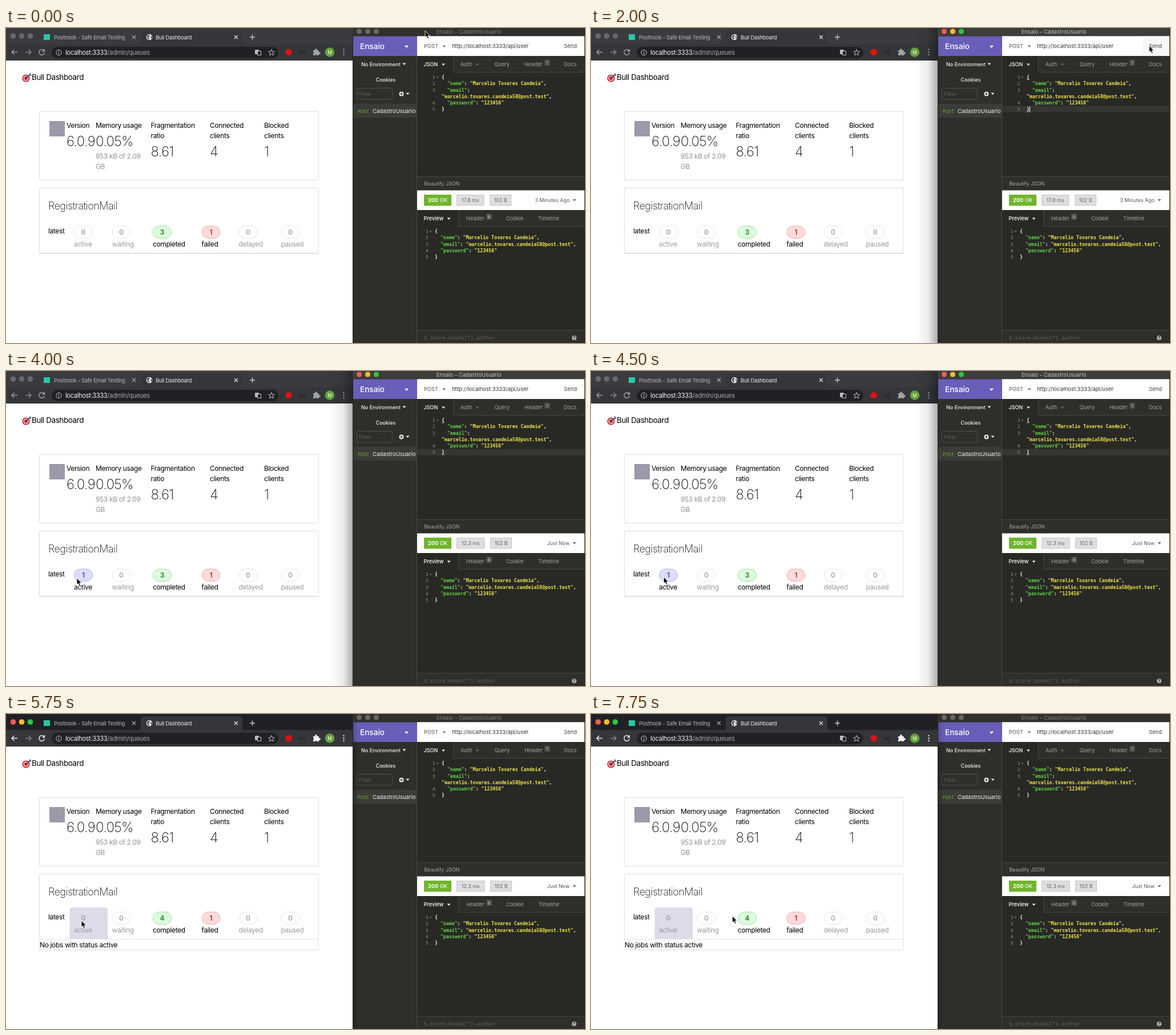
Recreate the animation shown at these times as an HTML page. Size 1014x552 px, loop 8 s.

```html
<!DOCTYPE html>
<html lang="en">
<head>
<meta charset="utf-8">
<title>Queue dashboard demo</title>
<style>
  html, body { margin: 0; width: 100%; height: 100%; overflow: hidden; background: #fff; }
  svg { display: block; width: 1014px; height: 552px; }
  text { font-family: Inter, Roboto, sans-serif; white-space: pre; }
  .tight { letter-spacing: -.03em; }
  .mono { font-family: "DejaVu Sans Mono", monospace; }
  .code { font-weight: 700; }
</style>
</head>
<body>
<svg id="stage" viewBox="0 0 1014 552"></svg>
<script>
const LOOP = 8000, STEP = 250;
const PERSON = 'Marcelio Tovares Candeia';
const EMAIL = 'marcelio.tovares.candeia58@post.test';
const WORKSPACE = 'Ensaio';

// When each state begins, in ms
const AT = { apiFocus: 2000, response: 2250, leaveSend: 2750, jobStarts: 4000,
  browserFocus: 4750, hoverActive: 5250, select: 5750 };

// Cursor tip: [time, x, y]
const PATH = [
  [0, 734, 5], [250, 748, 9], [750, 880, 26], [1250, 974, 33], [1500, 974, 33],
  [2000, 977.5, 31], [2500, 977.5, 31], [2750, 930, 62], [3250, 430, 250],
  [3750, 116, 368], [4000, 124, 363], [4750, 129, 360], [5500, 129, 360],
  [5750, 132, 362], [6000, 140, 362], [7000, 244, 363], [7250, 272, 361],
  [7500, 264, 358], [7750, 247.5, 354]
];

function cursorAt(t) {
  const i = PATH.findIndex(p => p[0] > t);
  if (i < 0) return PATH.at(-1).slice(1);
  const [a, b] = [PATH[i - 1], PATH[i]];
  const k = (t - a[0]) / (b[0] - a[0]);
  return [a[1] + (b[1] - a[1]) * k, a[2] + (b[2] - a[2]) * k];
}

const rect = (x, y, w, h, fill, more = '') =>
  `<rect x="${x}" y="${y}" width="${w}" height="${h}" fill="${fill}" ${more}/>`;
const circle = (x, y, r, fill, more = '') =>
  `<circle cx="${x}" cy="${y}" r="${r}" fill="${fill}" ${more}/>`;
const text = (x, y, size, fill, s, more = '') =>
  `<text x="${x}" y="${y}" font-size="${size}" fill="${fill}" ${more}>${s}</text>`;
const tight = (x, y, size, fill, s, weight = 400) =>
  text(x, y, size, fill, s, `class="tight" font-weight="${weight}"`);
const line = (d, color, width = 1, more = '') =>
  `<path d="${d}" fill="none" stroke="${color}" stroke-width="${width}" ${more}/>`;
const shape = (d, fill, more = '') => `<path d="${d}" fill="${fill}" ${more}/>`;
const caret = (x, y, fill, r = 3) => shape(`M${x - r} ${y - r / 2}h${2 * r}l${-r} ${r * 1.2}z`, fill);
const cross = (x, y, color) => line(`M${x - 3} ${y - 3}l6 6m0-6l-6 6`, color, 1.2);
const middle = 'text-anchor="middle"', end = 'text-anchor="end"', medium = 'font-weight="500"';

const lights = (x, y, r, gap, on, off) => ['#fc5b57', '#fdbc2e', '#29c940']
  .map((c, i) => circle(x + i * gap, y, r, on ? c : off)).join('');

function browserBar(active) {
  const icon = active ? '#f1f3f4' : '#a0a3a7', dim = '#85888c';
  const arrow = (x, dir, color) =>
    line(`M${x + 5 * dir} 42.5H${x - 5 * dir}m${4.5 * dir}-4.5l${-4.5 * dir} 4.5l${4.5 * dir} 4.5`, color, 1.4);
  return rect(0, 0, 607, 30, active ? '#202124' : '#3a3b3e') +
    rect(0, 28, 607, 29, '#35363a') +
    shape('M230 29q6 0 6-6V10q0-6 6-6H408q6 0 6 6V23q0 6 6 6z', '#35363a') +
    lights(12.5, 14, 4.8, 15, active, '#66686b') +
    rect(66, 11, 11, 10, '#28c8a8') +
    tight(84, 19.5, 9.4, '#b5b8bc', 'Postnook - Safe Email Testing') +
    tight(262, 19.5, 9.4, '#e8eaed', 'Bull Dashboard') +
    circle(251, 16, 5.3, '#e8eaed') +
    shape('M247 13l4-1 1 2-3 2 2 2-1 3-3-4zM253 15l2-1 1 3-2 2z', '#55585c') +
    cross(224, 16, '#a8abaf') + cross(403, 16, '#e0e2e5') +
    line('M427 16h9m-4.5-4.5v9', '#c5c8cc', 1.4) +
    arrow(15, 1, icon) + arrow(39, -1, dim) +
    line('M66.5 39.5a4.8 4.8 0 1 0 .9 4', icon, 1.4) + shape('M68 36.5v5h-5z', icon) +
    rect(80, 33, 397, 20, '#202124', 'rx="10"') +
    circle(92.5, 43, 4.7, 'none', 'stroke="#d0d2d5"') + line('M92.5 42v3.6m0-5.6v1.1', '#d0d2d5', 1.1) +
    tight(104, 46.8, 11.1, '#f1f3f4', 'localhost:3333<tspan fill="#a2a5a9">/admin/queues</tspan>') +
    rect(436, 38, 7, 8, '#b9bcc0', 'rx="1"') + rect(440.5, 40.5, 6, 7, '#202124', 'stroke="#b9bcc0"') +
    shape('M465 37.5l1.5 3.6 3.8.3-2.9 2.5.9 3.8-3.3-2-3.3 2 .9-3.8-2.9-2.5 3.8-.3z', 'none', 'stroke="#c4c7ca"') +
    circle(495, 42.5, 5.8, '#dc1414') +
    text(518.5, 46, 9, '#17181a', '(•)', middle) +
    shape('M538 39h3.2a2 2 0 1 1 3.6 0h3v3.3a2 2 0 1 1 0 3.5V48h-3.3a1.8 1.8 0 0 0-3.3 0H538v-3a1.8 1.8 0 0 0 0-3.3z', icon) +
    circle(567, 42.5, 8.3, '#64a338') + text(567, 45.6, 8.5, '#fff', 'M', middle) +
    [38, 42.5, 47].map(y => circle(591.5, y, 1.2, icon)).join('');
}

function stats() {
  const cols = [[106, '6.0.9', 'Version'], [157, '0.05%', 'Memory usage'],
    [253.5, '8.61', 'Fragmentation', 'ratio'], [357, '4', 'Connected', 'clients'], [452, '1', 'Blocked', 'clients']];
  return rect(58.5, 146.5, 488.5, 120, '#fff', 'stroke="#dedee2" rx="1"') +
    rect(76, 163, 27, 27, '#9a9aab') +
    cols.map(([x, value, a, b]) => tight(x, 175, 12, '#000', a) +
      (b ? tight(x, 193, 12, '#000', b) : '') +
      tight(x, b ? 224.5 : 206.5, 24, '#111', value, 200)).join('') +
    tight(157, 229, 12, '#949494', '953 kB of 2.09') + tight(157, 247, 12, '#949494', 'GB');
}

function queue(s) {
  const gray = ['#fff', '#e6e6ea', '#a2a2aa'];
  const tabs = [
    ['active', 119, s.running, ['#dcdcff', '#b5b5ee', '#47478f']], ['waiting', 185.5, 0],
    ['completed', 257, s.done, ['#dcfcdc', '#a5dfa9', '#2d7438']],
    ['failed', 342.5, 1, ['#ffdada', '#f0b0b0', '#8e3535']], ['delayed', 407.5, 0], ['paused', 481.5, 0]
  ];
  const badge = ([name, x, n, color]) => {
    const [fill, edge, ink] = n ? color : gray;
    const plain = name === 'active' && s.selected ? 'none' : fill;
    return rect(x + .5, 347, 32, 21.5, plain, `rx="10.75" stroke="${edge}"`) +
      text(x + 16.5, 362.3, 12, ink, n, middle + ' font-weight="600"') +
      tight(x, 382.5, 12, n ? '#000' : '#9c9ca0', name);
  };
  const tabBack = (x, w, fill) => shape(`M${x} 394V344q0-5 5-5h${w - 10}q5 0 5 5v50z`, fill);
  return rect(58.5, 280.5, 488.5, s.selected ? 133 : 114.5, '#fff', 'stroke="#dedee2" rx="1"') +
    line('M58 394.8H547', s.selected ? '#e0e0e4' : '#d3d3d8') +
    tight(74, 317.5, 18, '#111', 'RegistrationMail', 200) +
    tight(74, 360, 12, '#000', 'latest') +
    (s.hoverActive ? tabBack(111.5, 66.5, s.selected ? '#dcdbea' : '#eeedfc') : '') +
    (s.hoverDone ? tabBack(249.5, 85.5, '#eeedfe') : '') +
    tabs.map(badge).join('') +
    (s.selected ? tight(59, 409, 12, '#000', 'No jobs with status active') : '');
}

const dashboard = s => rect(0, 57, 607, 495, '#fff') +
  circle(35, 88, 6.6, '#c92d3a') + circle(35, 88, 4.6, '#f6e9e9') + circle(35, 88, 3.2, '#c92d3a') +
  line('M35 88L42 82', '#23343b', 1.4) + shape('M40 83l1-3 2-1 0 2 2 1-2 2z', '#3b7b8c') +
  tight(45, 91.3, 13.5, '#000', 'Bull Dashboard') + stats() + queue(s);

const key = k => `<tspan fill="#62cf48">"${k}"</tspan>`;
const str = v => `<tspan fill="#f0e54c">"${v}"</tspan>`;
const code = (x, y, s) => text(x, y, 8.22, '#f5f5ee', s, 'class="mono code"');
const number = (x, y, n) => text(x, y, 7.8, '#94958c', n, `class="mono" ${end}`);

function codeBlock(x, y, wrap) {
  const gap = 11.25, rows = [
    [1, '{'], [2, `  ${key('name')}: ${str(PERSON)},`],
    ...(wrap ? [[3, `  ${key('email')}:`], [0, `${str(EMAIL)},`]] : [[3, `  ${key('email')}: ${str(EMAIL)},`]]),
    [4, `  ${key('password')}: ${str('123456')}`], [5, '}']
  ];
  return rows.map(([n, s], i) => code(x, y + i * gap, s) +
    (n ? number(x - 11.5, y + i * gap, n) : '')).join('') + caret(x - 7.5, y - 2.5, '#77786f', 2.2);
}

function sidebar() {
  return rect(608, 14, 112, 538, '#2e2f2b') + rect(608, 14.5, 112, 34.5, '#695eb8') +
    text(620, 36.8, 13.6, '#fff', WORKSPACE, medium) + caret(701.5, 32.5, '#fff', 3.5) +
    text(622, 66.5, 9, '#f2f2ee', 'No Environment', medium) + caret(697.5, 63, '#eee') +
    text(665, 94.3, 9, '#f2f2ee', 'Cookies', `${middle} ${medium}`) +
    rect(614.5, 105.5, 62, 19.5, 'none', 'stroke="#51524e" rx="2"') + text(618, 118.8, 9, '#5d5e59', 'Filter') +
    circle(692.5, 115.5, 4, '#eee') + line('M690 115.5h5m-2.5-2.5v5', '#2e2f2b', 1.2) + caret(703.5, 115, '#eee') +
    rect(608, 133, 112, 24, '#3b3c38') +
    text(616, 148.5, 7.4, '#75ba24', 'POST') + text(642, 148.8, 9.5, '#f5f5f1', 'CadastroUsuario') +
    line('M719.5 49V552', '#454642');
}

function requestPane(s) {
  const dim = '#a3a49d', edge = '#464743';
  return rect(720, 14.5, 294, 34.5, '#fff') +
    (s.sendHover ? rect(966, 14.5, 48, 34.5, '#f7f7f7') : '') +
    text(732, 35.2, 9.3, '#555', 'POST') + caret(767.5, 32, '#777') +
    text(781, 35.2, 9.5, '#333', 'http://localhost:3333/api/user') + text(977, 35.2, 9.4, '#444', 'Send') +
    rect(720, 49, 294, 212, '#282925') + rect(783, 49, 231, 28, '#2e2f2b') +
    line('M783.5 49V77.5H1014', edge) +
    text(731.5, 67, 9, '#fff', 'JSON', medium) + caret(766, 64, '#eee') +
    text(796, 67, 9.2, dim, 'Auth') + caret(825.5, 64, '#686963') + text(855.5, 67, 9.2, dim, 'Query') +
    text(908, 67, 9.2, dim, 'Header') + rect(943, 55.5, 9.5, 10.5, '#50514c', 'rx="1"') +
    text(947.7, 63.5, 7.5, '#c5c6be', '1', middle) + text(977, 67, 9.2, dim, 'Docs') +
    (s.apiActive ? rect(720, 136.5, 293, 11.5, '#353631') + line('M763 90.5h5M763 146.8h5', '#c8c8bd', .8) : '') +
    codeBlock(763, 89, true) +
    (s.typing ? line('M768.5 137V147.5', '#fff') : '') +
    rect(720, 260, 294, 25, '#2e2f2b') + line('M720 260.5H1014', edge) +
    text(732.5, 275.7, 8.95, '#a9aaa3', 'Beautify JSON');
}

function responsePane(s) {
  const dim = '#a3a49d', edge = '#464743', x = s.sent ? 848 : 847;
  const pill = (px, w, label) => rect(px + .5, 292.5, w, 18.5, '#dedede', 'stroke="#c8c8c8"') +
    text(px + w / 2 + .5, 305, 9, '#666', label, middle);
  return rect(720, 319, 294, 211, '#282925') + rect(792, 319, 222, 28, '#2e2f2b') +
    rect(720, 284.5, 294, 34.5, '#fff') +
    rect(732, 292, 48, 19.5, '#6fb52c') +
    text(756, 305, 9.2, '#fff', '<tspan font-weight="700">200</tspan> OK', `${middle} ${medium}`) +
    pill(789, s.sent ? 48.5 : 47.5, s.sent ? '12.3 ms' : '17.8 ms') + pill(x, 37, '102 B') +
    text(987, 305, 8.9, '#555', s.sent ? 'Just Now' : '3 Minutes Ago', end) + caret(995.5, 301.5, '#666') +
    line('M792.5 319V347.5H1014', edge) +
    text(731.5, 337, 9.2, '#fff', 'Preview', medium) + caret(775.5, 334, '#eee') +
    text(806, 337, 9.2, dim, 'Header') + rect(841, 325.5, 10, 10.5, '#50514c', 'rx="1"') +
    text(846, 333.5, 7.5, '#c5c6be', '6', middle) +
    text(876, 337, 9.2, dim, 'Cookie') + text(932, 337, 9.2, dim, 'Timeline') +
    codeBlock(751, 359, false) +
    rect(720, 529, 294, 23, '#2e2f2b') + line('M720 529.5H1014', edge) +
    text(732, 545.5, 9, '#63645d', '$.store.books[*].author', 'class="mono"') +
    circle(995, 543, 4, '#b3b4ad') + text(995, 545.7, 7.5, '#2e2f2b', '?', middle + ' font-weight="700"');
}

const apiClient = s =>
  (s.apiActive ? rect(567, 0, 41, 552, 'url(#shade)') : '') +
  rect(607, 0, 407, 14.5, s.apiActive ? '#3d3d3a' : '#30302d') +
  lights(618.5, 6, 4.6, 15, s.apiActive, '#686865') +
  text(810.5, 9.6, 9.4, s.apiActive ? '#c4c4c0' : '#82827e', `${WORKSPACE} – CadastroUsuario`, middle) +
  sidebar() + requestPane(s) + responsePane(s) + rect(607, 14, 1, 538, '#20211e') + rect(1013, 0, 1, 552, '#20211e') +
  (s.browserActive ? rect(608, 14, 14, 538, 'url(#shadeRight)') : '');

const gradient = (id, from, to) => `<linearGradient id="${id}">
  <stop offset="0" stop-opacity="${from}"/><stop offset=".55" stop-opacity="${(from + to) / 5}"/>
  <stop offset="1" stop-opacity="${to}"/></linearGradient>`;
const defs = `<defs>${gradient('shade', 0, .33)}${gradient('shadeRight', .18, 0)}</defs>`;

function scene(t) {
  const [x, y] = cursorAt(t);
  const selected = t >= AT.select;
  const s = {
    selected,
    browserActive: t >= AT.browserFocus,
    apiActive: t >= AT.apiFocus && t < AT.browserFocus,
    typing: t >= AT.apiFocus && t < AT.response,
    sendHover: t >= AT.apiFocus && t < AT.leaveSend,
    sent: t >= AT.response,
    running: t >= AT.jobStarts && !selected ? 1 : 0,
    done: selected ? 4 : 3,
    hoverActive: t >= AT.hoverActive,
    hoverDone: selected && x >= 250 && x < 335
  };
  return defs + browserBar(s.browserActive) + dashboard(s) + apiClient(s) +
    shape('M0 0V11.5L2.6 9.2L4.5 13.5L6.6 12.6L4.8 8.4H8.3z', '#000',
      `stroke="#fff" stroke-width=".9" transform="translate(${x} ${y})"`);
}

const stage = document.getElementById('stage');
let shown = -1;
function tick() {
  const t = Math.floor(performance.now() % LOOP / STEP) * STEP;
  if (t !== shown) stage.innerHTML = scene(shown = t);
  requestAnimationFrame(tick);
}
tick();
</script>
</body>
</html>
```
